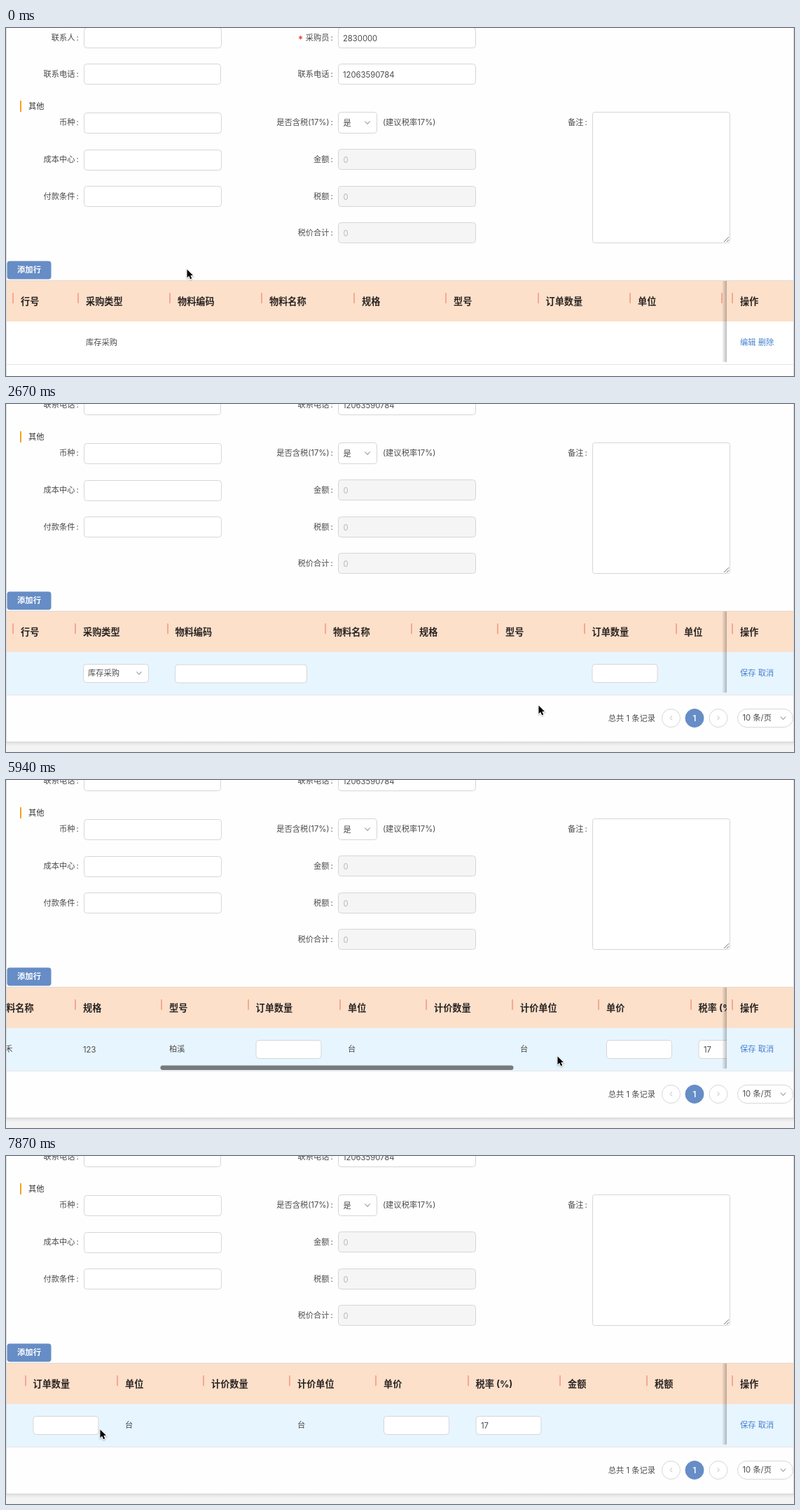
Write an HTML page with a canvas that moves like this. It is 1125 px wide and 498 px high and loops after 8000 ms.

```html
<!DOCTYPE html>
<html lang="zh-CN">
<head>
<meta charset="utf-8">
<style>
html, body { margin: 0; width: 100%; height: 100%; overflow: hidden; background: #fff; }
canvas { display: block; }
</style>
</head>
<body>
<canvas id="stage" width="1125" height="498"></canvas>
<script>
const c = document.getElementById('stage').getContext('2d');
const LOOP = 8000, TICK = 148.5;
const FAMILY = 'Inter, "Noto Sans CJK SC", "Noto Sans CJK", sans-serif';
const SMALL = 11.28, BIG = 13.16;
const INK = '#4c4c4c', LINE = '#d6d6d6', BLUE = '#668dc6', LINK = '#4580d0';
const FIXED_X = 1029;
const CODE = '730000164908357206', NAME = '云禾', MODEL = '柏溪';

// Steps are [tick, values...]; each holds until the next one.
const pageSteps = [[0, 0], [1, 38], [2, 65]];
const tableSteps = [[0, 0], [38, 70], [39, 290], [40, 480], [41, 565], [42, 630],
  [43, 686], [44, 732], [45, 770], [46, 798]];
const pointerSteps = [[0, 258, 345], [4, 520, 372], [5, 807, 392], [6, 1020, 392],
  [8, 1050, 396], [9, 1058, 388], [18, 760, 431], [19, 640, 428], [20, 500, 415],
  [21, 400, 398], [22, 345, 390], [23, 330, 388], [30, 350, 345], [32, 560, 395],
  [33, 736, 421], [34, 765, 414], [35, 780, 404], [36, 786, 397], [37, 787, 395],
  [50, 640, 394], [51, 380, 393], [52, 190, 392], [53, 134, 391]];
const at = (steps, n) => steps.filter(s => s[0] <= n).pop().slice(1);

const titles = ['行号', '采购类型', '物料编码', '物料名称', '规格', '型号', '订单数量',
  '单位', '计价数量', '计价单位', '单价', '税率 (%)', '金额', '税额'];
const viewCols = [10, 103, 234, 365, 497, 628, 759.5, 891, 1022];
const editCols = [10, 99, 230.5, 456, 579, 702, 825.5, 957, 1080, 1203, 1326, 1457.5, 1589, 1713];

function text(s, x, y, { size = SMALL, weight = 400, color = INK, align = 'left' } = {}) {
  c.font = `${weight} ${size}px ${FAMILY}`;
  c.textAlign = align;
  c.fillStyle = color;
  c.fillText(s, x, y + size * .37);
}

function rect(x, y, w, h, color) {
  c.fillStyle = color;
  c.fillRect(x, y, w, h);
}

function box(x, y, w, h, { r = 4, fill = '#fff', stroke = LINE } = {}) {
  c.beginPath();
  c.roundRect(x + .5, y + .5, w - 1, h - 1, r);
  c.fillStyle = fill;
  c.fill();
  if (!stroke) return;
  c.strokeStyle = stroke;
  c.lineWidth = 1;
  c.stroke();
}

function path(points, color, width = 1) {
  c.beginPath();
  points.forEach(([x, y]) => c.lineTo(x, y));
  c.strokeStyle = color;
  c.lineWidth = width;
  c.stroke();
}

const chevron = (x, y) =>
  path([[x - 3.5, y - 2], [x, y + 2], [x + 3.5, y - 2]], '#777');

function label(s, end, y) {
  text(s, end, y, { align: 'right' });
  text(':', end + 2, y);
}

function drawForm() {
  label('联系人', 98.5, -51.5);
  box(111, -66, 197, 30);
  text('*', 417, -49, { color: '#e8392f', size: 13, weight: 600 });
  label('采购员', 461.5, -51.5);
  box(474, -66, 197, 30);
  text('2830000', 481, -50);

  label('联系电话', 98.5, .5);
  box(111, -14, 196, 30);
  label('联系电话', 461.5, .5);
  box(474, -14, 197, 30);
  text('12063590784', 481, 1.5);

  rect(20, 39, 2, 16, '#f7a31c');
  text('其他', 32, 46.5, { color: '#333' });

  ['币种', '成本中心', '付款条件'].forEach((s, i) => {
    label(s, 98.5, 70.3 + i * 52.6);
    box(111, Math.round(56.2 + i * 52.6), 197, 30);
  });

  label('是否含税(17%)', 461.5, 70.3);
  box(474, 55, 56, 31);
  text('是', 481.5, 70.5);
  chevron(516, 70.5);
  text('(建议税率17%)', 538, 70.3);
  ['金额', '税额', '税价合计'].forEach((s, i) => {
    const y = 123 + i * 52.6;
    label(s, 461.5, y);
    box(474, Math.round(y - 15), 197, 30, { fill: '#f5f5f5' });
    text('0', 481.5, y + 1, { color: '#b8b8b8' });
  });

  label('备注', 824.5, 70.3);
  box(837, 55, 197, 188, { r: 3 });
  path([[1025, 241], [1032, 234]], '#777');
  path([[1029, 241], [1032, 238]], '#777');

  box(1, 268, 64, 27, { fill: BLUE, stroke: null });
  text('添加行', 33, 281, { color: '#fff', weight: 600, align: 'center' });
}

function drawCodeInput(n) {
  const focused = n >= 24;
  if (focused) box(240, 371, 191, 30, { r: 5, fill: '#c3e2fb', stroke: null });
  box(241, 372.5, 189, 27, { stroke: focused ? '#4aa8ee' : LINE });
  const value = n >= 31 ? `${CODE}[${NAME}]` : CODE.slice(0, Math.min(2, Math.max(0, n - 24)));
  text(value, 249, 386.5);
  if (focused) rect(249.5 + c.measureText(value).width, 379, 1, 14, '#222');
}

function drawEditCells(n) {
  box(110, 372, 94, 27);
  text('库存采购', 117, 385);
  chevron(190, 385);
  drawCodeInput(n);
  [836.5, 1337, 1468.5].forEach(x => box(x, 372, 94, 27));
  text('17', 1476, 386);
  if (n < 31) return;
  text(NAME, 467, 385);
  text('123', 590, 385.5);
  text(MODEL, 713, 385);
  text('台', 968, 385);
  text('台', 1214, 385);
}

function headCell(s, x) {
  rect(Math.round(x) - .5, 314, 1, 15, '#f0705a');
  text(s, x + 11, 326, { size: BIG, weight: 700, color: '#2b2523' });
}

function drawTable(n) {
  const editing = n >= 10, scroll = at(tableSteps, n)[0];
  const rowColor = n >= 6 ? '#e7f5fe' : '#fff';
  rect(1, 296, 1123, 59, '#fce0ca');
  rect(1, 296, 1123, 1, '#e6d9d0');
  rect(1, 355, 1123, 61, rowColor);
  rect(1, 416, 1123, 1, '#e6e6e6');

  c.save();
  c.beginPath();
  c.rect(1, 296, FIXED_X - 1, 121);
  c.clip();
  c.translate(-scroll, 0);
  (editing ? editCols : viewCols).forEach((x, i) => headCell(titles[i], x));
  if (editing) drawEditCells(n);
  else text('库存采购', 114, 385);
  c.restore();

  const shade = c.createLinearGradient(FIXED_X - 7, 0, FIXED_X, 0);
  shade.addColorStop(0, 'rgba(0,0,0,0)');
  shade.addColorStop(1, 'rgba(0,0,0,.26)');
  rect(FIXED_X - 7, 297, 7, 116, shade);
  rect(FIXED_X, 297, 95, 58, '#fce0ca');
  rect(FIXED_X, 355, 95, 61, rowColor);
  headCell('操作', 1037);
  (editing ? ['保存', '取消'] : ['编辑', '删除']).forEach((s, i) =>
    text(s, 1048 + i * 25.8, 385, { color: LINK }));

  if (n >= 38 && n < 48) {
    c.globalAlpha = n < 47 ? 1 : .5;
    box(3 + scroll * .452, 408, 505, 7.5, { r: 3.3, fill: '#757b7d', stroke: null });
    c.globalAlpha = 1;
  }
}

function drawPager() {
  text('总共 1 条记录', 927, 449.5, { align: 'right' });
  box(936, 436, 27, 27, { r: 13 });
  box(969.5, 436, 27, 27, { r: 13, fill: BLUE, stroke: BLUE });
  box(1003.5, 436, 27, 27, { r: 13 });
  path([[951, 446.5], [948, 449.3], [951, 452]], '#bbb');
  path([[1015.5, 446.5], [1018.5, 449.3], [1015.5, 452]], '#bbb');
  text('1', 983, 449.5, { color: '#fff', weight: 600, align: 'center' });
  box(1044, 436, 80, 27, { r: 13 });
  text('10 条/页', 1051.5, 449.3);
  chevron(1109.5, 449.5);
}

function drawOptions(n) {
  if (n < 26 || n > 31) return;
  c.save();
  c.globalAlpha = n === 26 || n === 31 ? .5 : 1;
  c.shadowColor = 'rgba(0,0,0,.16)';
  c.shadowBlur = 8;
  box(242, 135, 188, 234, { stroke: null });
  c.shadowColor = 'transparent';
  c.clip();
  const chars = '青岚松月石泉云帆竹影禾风';
  for (let i = 0; i < 8; i++) {
    const y = 154 + i * 30, picked = i === 6;
    if (picked) rect(242, y - 15, 188, 30, '#e7f5fe');
    const code = picked ? CODE : '73000016' + (4908357206 - (6 - i) * 10407913);
    const k = i * 2 % 12;
    text(`${code}[${picked ? NAME : chars.slice(k, k + 2)}]`, 253, y);
  }
  c.restore();
}

function drawPointer([x, y]) {
  c.save();
  c.translate(x, y);
  c.shadowColor = 'rgba(0,0,0,.3)';
  c.shadowBlur = 2;
  c.shadowOffsetY = 1;
  const arrow = new Path2D('M.5 .5V12.3L3.2 9.8L5.2 14.2L7.2 13.3L5.3 9H9Z');
  c.lineWidth = 1.8;
  c.strokeStyle = '#fff';
  c.stroke(arrow);
  c.shadowColor = 'transparent';
  c.fillStyle = '#000';
  c.fill(arrow);
  c.restore();
}

function draw(n) {
  rect(0, 0, 1125, 498, '#f3f3f3');
  c.save();
  c.translate(0, 65 - at(pageSteps, n)[0]);
  const shadow = c.createLinearGradient(0, 483, 0, 489);
  shadow.addColorStop(0, '#d9d9d9');
  shadow.addColorStop(1, '#f3f3f3');
  rect(0, 483, 1125, 6, shadow);
  rect(0, -80, 1125, 563, '#fefefe');
  rect(0, -80, 1, 563, '#d9d9d9');
  rect(1124, -80, 1, 563, '#d9d9d9');
  drawForm();
  drawTable(n);
  drawPager();
  drawOptions(n);
  c.restore();
  drawPointer(at(pointerSteps, n));
}

const start = performance.now();
function tick() {
  const t = (performance.now() - start) % LOOP;
  draw(Math.min(53, Math.floor((t + 2) / TICK)));
  requestAnimationFrame(tick);
}
tick();
</script>
</body>
</html>
```
